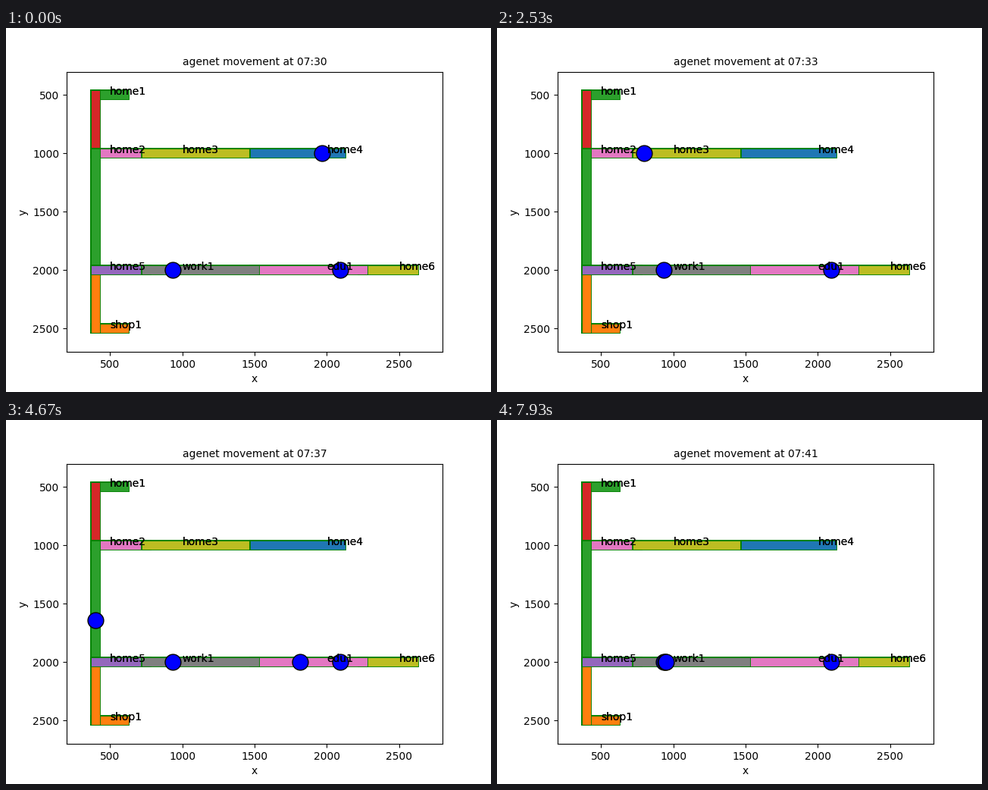
Animation, 640 px wide and 480 px high, one loop 8 s. Source, as a matplotlib script:

```python
import math

import matplotlib.pyplot as plt
from matplotlib import patheffects
from matplotlib.animation import FuncAnimation

FRAMES = 120
LOOP_MS = 8000

# Roads in drawing order: start, end, colour.
ROADS = [
    ((400, 500), (600, 500), "tab:green"),
    ((400, 500), (400, 1000), "tab:red"),
    ((400, 1000), (750, 1000), "tab:pink"),
    ((750, 1000), (1500, 1000), "tab:olive"),
    ((1500, 1000), (2100, 1000), "tab:blue"),
    ((400, 1000), (400, 2000), "tab:green"),
    ((400, 2500), (600, 2500), "tab:orange"),
    ((400, 2000), (400, 2500), "tab:orange"),
    ((400, 2000), (750, 2000), "tab:purple"),
    ((2250, 2000), (2600, 2000), "tab:olive"),
    ((1500, 2000), (2250, 2000), "tab:pink"),
    ((750, 2000), (1500, 2000), "tab:gray"),
]

PLACES = {
    "home1": (500, 500),
    "home2": (500, 1000),
    "home3": (1000, 1000),
    "home4": (2000, 1000),
    "home5": (500, 2000),
    "work1": (1000, 2000),
    "edu1": (2000, 2000),
    "home6": (2500, 2000),
    "shop1": (500, 2500),
}

PARKED = [(936, 2000), (2094, 2000)]

# Travellers: departure frame, distance per frame, route.
TRIPS = [
    (-1, 32, [(2000, 1000), (1500, 1000), (750, 1000), (400, 1000),
              (400, 2000), (750, 2000), (942, 2000)]),
    (49, 100 / 3, [(2500, 2000), (2250, 2000), (1500, 2000),
                   (750, 2000), (950, 2000)]),
]


def walk(route, speed, steps):
    """Position after some steps; each leg begins on a fresh step."""
    for (x0, y0), (x1, y1) in zip(route, route[1:]):
        length = math.hypot(x1 - x0, y1 - y0)
        needed = math.ceil(length / speed)
        if steps <= needed:
            part = min(steps * speed / length, 1)
            return x0 + (x1 - x0) * part, y0 + (y1 - y0) * part
        steps -= needed
    return route[-1]


def add_agent(pos=None):
    x, y = ([pos[0]], [pos[1]]) if pos else ([], [])
    return ax.plot(x, y, "o", ms=15, mfc="blue", mec="black")[0]


plt.rcParams["font.family"] = "DejaVu Sans"
fig, ax = plt.subplots(figsize=(6.4, 4.8), dpi=100)
ax.set(xlim=(200, 2800), ylim=(2700, 300), xlabel="x", ylabel="y")
ax.set_xticks(range(500, 2501, 500))
ax.set_yticks(range(500, 2501, 500))
title = ax.set_title("", fontsize=10)

outline = [patheffects.Stroke(linewidth=10, foreground="g"),
           patheffects.Normal()]
for (x0, y0), (x1, y1), color in ROADS:
    ax.plot([x0, x1], [y0, y1], color=color, lw=8, path_effects=outline)

# Labels are laid twice, which makes them slightly heavier.
for name, (x, y) in PLACES.items():
    for _ in range(2):
        ax.text(x, y, name)

for spot in PARKED:
    add_agent(spot)
movers = [add_agent() for _ in TRIPS]


def update(frame):
    title.set_text(f"agenet movement at 07:{30 + (frame + 1) // 10:02d}")
    for dot, (start, speed, route) in zip(movers, TRIPS):
        if frame < start:
            dot.set_data([], [])
        else:
            x, y = walk(route, speed, frame - start)
            dot.set_data([x], [y])
    return [title, *movers]


anim = FuncAnimation(fig, update, frames=FRAMES, interval=LOOP_MS / FRAMES,
                     repeat=True, repeat_delay=0)
plt.show()
```
